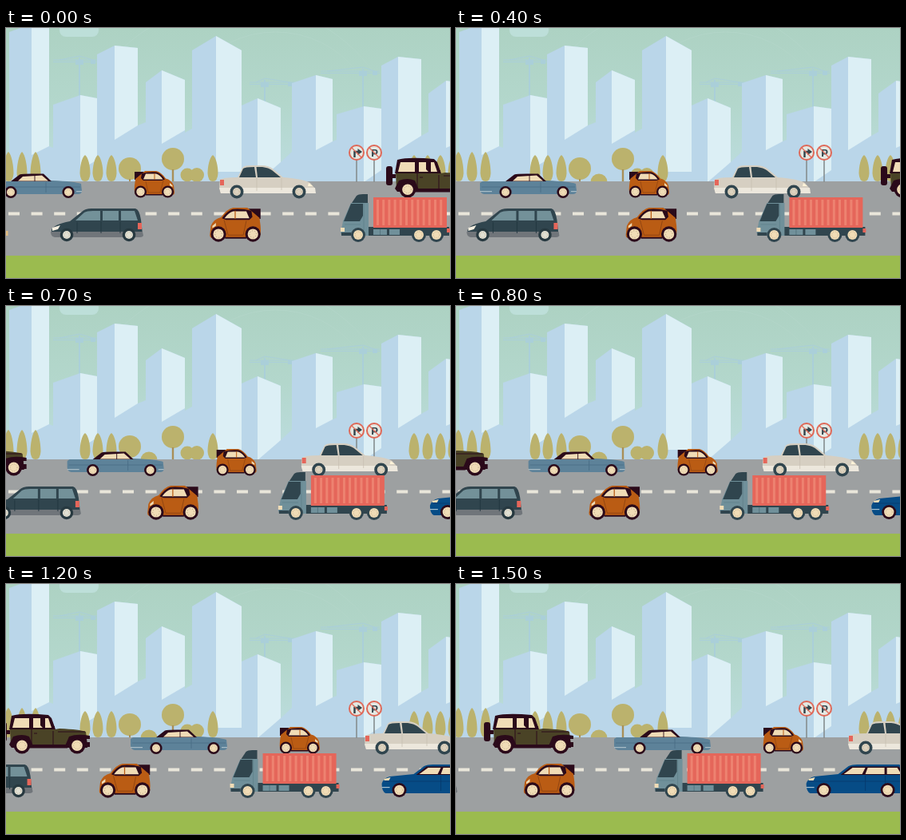
Recreate the animation shown at these times as an HTML page with a canvas. Size 556x313 px, loop 1.6 s.

```html
<!DOCTYPE html>
<html lang="en">
<head>
<meta charset="utf-8">
<title>City traffic</title>
<style>
html, body { margin: 0; width: 100%; height: 100%; overflow: hidden; background: #9ea1a2; }
canvas { display: block; width: 100vw; height: 100vh; }
</style>
</head>
<body>
<canvas id="stage" width="556" height="313"></canvas>
<script>
const ctx = document.getElementById('stage').getContext('2d');
const W = 556, H = 313, LOOP = 1600, STEP = 100;
const DARK = '#2b0a1a', CREAM = '#f0dcb6', SLATE = '#30454e', STEEL = '#70909a';
const RED = '#e5665a', ORANGE = '#ba5c14', OLIVE = '#4a4326';

function fill(color, d) {
  ctx.fillStyle = color;
  ctx.fill(new Path2D(d));
}
function line(color, width, d) {
  ctx.strokeStyle = color;
  ctx.lineWidth = width;
  ctx.stroke(new Path2D(d));
}
function rect(color, x, y, w, h) {
  ctx.fillStyle = color;
  ctx.fillRect(x, y, w, h);
}
function disc(color, x, y, r) {
  ctx.fillStyle = color;
  ctx.beginPath();
  ctx.arc(x, y, r, 0, Math.PI * 2);
  ctx.fill();
}
function wheels(xs, y, r, hub, tire = DARK, rim = CREAM) {
  for (const x of xs) {
    disc(tire, x, y, r);
    disc(rim, x, y, hub);
    ctx.setLineDash([1, 1.6]);
    ctx.strokeStyle = '#b59c7c';
    ctx.lineWidth = 0.7;
    ctx.beginPath();
    ctx.arc(x, y, hub * 0.65, 0, Math.PI * 2);
    ctx.stroke();
    ctx.setLineDash([]);
  }
}

// left, ridge, right: x positions; then the three roof heights and two lower edges of the lit face
const towers = [
  [4, 32, 54, 5, -5, -2, 159, 148],
  [59, 93, 114, 96, 84, 88, 178, 165],
  [114, 136, 165, 33, 22, 25, 140, 122],
  [175, 195, 224, 68, 53, 65, 145, 128],
  [233, 263, 295, 28, 10, 28, 180, 180],
  [295, 315, 344, 97, 88, 100, 193, 168],
  [358, 388, 409, 69, 59, 64, 153, 142],
  [414, 448, 470, 108, 98, 101, 193, 178],
  [470, 491, 520, 47, 36, 39, 153, 135],
  [529, 551, 575, 82, 66, 70, 150, 140]
];

function crane(x, y, left, right, bottom) {
  const c = '#aacfd9';
  line(c, 2, `M${x} ${y - 3}V${bottom}`);
  line(c, 1, `M${left} ${y}H${right}M${left} ${y + 2.5}H${right}M${left + 8} ${y}L${x} ${y - 5}L${right - 6} ${y}`);
  rect(c, x - 5, y, 10, 6);
  rect(c, right - 9, y, 6, 5);
}

function city() {
  const sky = ctx.createLinearGradient(0, 0, 0, 192);
  sky.addColorStop(0, '#add2c3');
  sky.addColorStop(0.5, '#b3d7cc');
  sky.addColorStop(1, '#bddde0');
  rect(sky, 0, 0, W, 193);
  line('#b3d6c9', 1, 'M110 70A210 210 0 0 1 470 70M235 55A130 130 0 0 1 440 55');
  ctx.fillStyle = '#bddfd9';
  ctx.beginPath();
  ctx.roundRect(67, -6, 49, 17, 8);
  ctx.fill();
  crane(92, 40, 59, 115, 90);
  crane(324, 68, 305, 362, 98);
  crane(447, 54, 394, 468, 102);

  const shade = '#bad6e9', light = '#dceff5';
  fill(shade, 'M0 160L54 148L59 150L114 150L165 122L175 118L224 131L233 126L295 150L344 168L358 155L409 142L414 140L470 150L520 135L529 130L556 128V193H0Z');
  for (const [l, m, r, yl, ym, yr, bm, br] of towers) {
    fill(shade, `M${l} ${yl}L${m} ${ym}L${r} ${yr}V193H${l}Z`);
    fill(light, `M${m} ${ym}L${r} ${yr}V${br}L${m} ${bm}Z`);
  }
}

function trees() {
  const leaf = '#bbb26d', trunk = '#a98f58';
  for (const [x, top] of [[3, 155], [20, 155], [37, 155], [99, 159], [115, 159], [132, 159],
    [259, 159], [511, 159], [528, 159], [544, 159], [560, 159]]) {
    fill(leaf, `M${x} ${top}C${x + 4} ${top + 3} ${x + 6.5} 173 ${x + 6.5} 182Q${x + 6} 192 ${x} 192Q${x - 6} 192 ${x - 6.5} 182C${x - 6.5} 173 ${x - 4} ${top + 3} ${x} ${top}Z`);
  }
  for (const [x, y, r] of [[155, 176, 14], [209, 164, 14], [179, 193, 10.5], [227, 184, 8.5], [239, 184, 9]]) {
    disc(leaf, x, y, r);
  }
  rect(trunk, 154, 189, 2, 3);
  rect(trunk, 207.8, 177, 2.4, 15);
}

function signs() {
  for (const x of [439, 461]) {
    rect('#858e90', x - 0.8, 164, 1.6, 29);
    disc('#df6857', x, 156, 10);
    disc('#e4e8e2', x, 156, 8);
  }
  line('#30424a', 2.4, 'M436.5 162V155H441');
  fill('#30424a', 'M440.5 151L446 155L440.5 159Z');
  ctx.fillStyle = '#30424a';
  ctx.font = 'bold 13px Arial, "Liberation Sans", sans-serif';
  ctx.textAlign = 'center';
  ctx.fillText('P', 461.5, 160.5);
  line('#df6857', 1.3, 'M433 150L445 162M455 150L467 162');
}

function road() {
  rect('#9da0a1', 0, 192, W, 93);
  rect('#9bbb4f', 0, 285, W, H - 285);
  for (let x = 3; x < W; x += 28.6) rect('#e9e6da', x, 230.5, 14, 4);
}

function convertible() {
  fill('#5d8299', 'M0 194L3 192H36L84 191Q112 192 120 195L121 204Q121 208 116 208H5Q0 207 0 202Z');
  line('#4b6f86', 0.9, 'M2 199H119M76 193V206');
  fill(DARK, 'M32 192L43 183.5Q46 182.5 58 182.5H73L83 192Z');
  fill(CREAM, 'M41 191.5L47 186L71 184.5L79 191.5Z');
  line(DARK, 0.9, 'M62 192V185');
  rect('#a9bdc7', 0, 204, 15, 1.2);
  rect('#a9bdc7', 114, 204, 7, 1.2);
  wheels([32, 104], 205.5, 7.6, 5);
}

function mini() {
  fill(DARK, 'M1 1H13L9 11L1 11Z');
  fill(ORANGE, 'M2 10L8 5L14 0H28Q34 1 40 9.5Q47 11 50 18L51 27Q51 30 48 30H3Q0 28 1 18Z');
  fill(DARK, 'M10 3Q20 0.5 29 1.5Q35 4 39 10.5L35 12L12 12L9 9Z');
  fill(CREAM, 'M12 10.5L15 3.5H28Q33 5 36.5 10.5Z');
  line(ORANGE, 1, 'M26 3V11');
  line('#8e4312', 0.7, 'M15 13L18 27H33L37 12');
  rect(DARK, 15, 29, 21, 1.5);
  fill(CREAM, 'M45 15L48.5 18V20L45 18Z');
  wheels([8.5, 42.5], 26, 7.6, 5.2);
}

function sedan() {
  fill('#d6cfc2', 'M1 190Q4 187 23 187L29 175Q31 172 39 172H53Q62 172 68 177L80 187Q106 189 114 194L120 201V207H2Q-1 200 1 190Z');
  fill('#ece7dc', 'M0 200H120L121 207H2Z');
  fill(SLATE, 'M25 187L30 176Q32 174 44 174L46 187ZM48 187L46.5 174H54Q62 175 66 178L77 187Z');
  line('#c6beb1', 0.7, 'M47 188V204M78 188V203');
  rect(RED, 1, 190, 5, 7);
  fill('#fff4d9', 'M112 194L117 198H111Z');
  wheels([22, 100], 205, 8.5, 4.9, SLATE, '#dcd3c0');
}

function jeep() {
  fill(DARK, 'M11 182L14 165Q28 161 60 164L64 168L69 182Z');
  ctx.fillStyle = DARK;
  ctx.beginPath();
  ctx.roundRect(0, 173, 8, 24, 3);
  ctx.fill();
  rect(DARK, 6, 183, 6, 5);
  fill(OLIVE, 'M12 182H68L74 181Q100 182 107 185L109 203H13Z');
  fill(CREAM, 'M15 180L18 168H36V180ZM41 180V168H50V177L53 180ZM56 180V168H60L64 180Z');
  line(DARK, 1, 'M39 181V203M66 184V203M42 187H46M72 185H106');
  rect(DARK, 64, 178, 4, 4);
  rect(DARK, 36, 201, 48, 4.5);
  fill(DARK, 'M11 201L16 191Q27 187 36 191L42 205H14Z');
  fill(DARK, 'M80 205L86 191Q96 187 112 190V194H108L109 205Z');
  rect(DARK, 106, 198, 6, 6);
  wheels([27, 96], 202.2, 10.3, 6.8);
}

function van() {
  fill(SLATE, 'M1 253Q3 246 24 242L39 230Q43 226 51 226H106Q111 227 113 240L115 258H1Z');
  fill('#70757a', 'M0 255H115L116 260Q115 262 112 262H5Q0 261 0 255Z');
  fill('#739199', 'M31 241L42 231Q45 229 53 229H62V241ZM65 229H85V241H65ZM88 229H105L109 241H88Z');
  line('#223740', 0.9, 'M33 243V257M63 242V257M87 242V257');
  fill('#f4eee0', 'M2 250L12 247L9 252L2 254Z');
  rect(RED, 109, 244, 5, 8);
  wheels([20, 98], 259, 8.3, 5, '#273940', '#e0e0d4');
}

function truck() {
  rect(SLATE, 30, 249, 107, 11);
  fill(STEEL, 'M2 252L4 242L14 219H36V260H3Q0 257 2 252Z');
  fill(SLATE, 'M15 219L21 210Q23 208 29 208H35V219Z');
  fill(SLATE, 'M5 242L14 220H29V235L25 242Z');
  line('#60818b', 0.8, 'M30 220V257M6 246H26');
  rect(RED, 42, 212, 92, 38);
  for (let x = 46; x < 132; x += 7.2) rect('#ed8270', x, 215, 3, 32);
  rect(STEEL, 42, 252, 17, 7);
  rect(STEEL, 62, 252, 13, 7);
  rect('#587680', 50, 252, 1, 7);
  rect(CREAM, 1, 250, 5, 5);
  rect(SLATE, 2, 256, 12, 4);
  rect(RED, 134, 251, 4, 5);
  wheels([23, 99, 121], 259, 9, 6, SLATE);
}

function wagon() {
  fill('#064c86', 'M0 250Q2 243 10 241L40 238L53 228Q57 226 64 226H116Q123 228 128 240L130 258Q129 262 124 262H5Q0 260 0 250Z');
  fill(DARK, 'M43 239L56 228.5H116L123 239Z');
  fill(CREAM, 'M47 238L58 230H74L70 238ZM74 238L77 230H98V238ZM101 230H114L119 238H101Z');
  line('#07396a', 0.8, 'M4 247H126M74 240V259M99 240V257');
  fill(CREAM, 'M3 244L11 242L9 246H3Z');
  rect('#a9c1d0', 0, 254, 10, 1.2);
  wheels([22, 102], 258, 9, 6.2);
}

function place(draw, x, y = 0, sx = 1, sy = 1) {
  ctx.save();
  ctx.translate(x, y);
  ctx.scale(sx, sy);
  draw();
  ctx.restore();
}

// The traffic advances in uneven ticks: three per step, with an extra one at steps 6, 9 and 12.
function ticks(step) {
  return 3 * step + Math.max(0, Math.min(3, Math.floor(step / 3) - 1));
}

function render(now) {
  const t = ticks(Math.floor((now % LOOP) / STEP));
  const right = t * 14 / 3, left = -t * 3.55;
  city();
  trees();
  road();
  signs();

  place(jeep, -189 + right);
  place(convertible, -26 + right);
  place(mini, 160 + right, 179);
  place(sedan, 267 + right);
  place(jeep, 476 + right);

  rect('#e2bd83', left, 254, 2.5, 6);
  place(van, 56 + left);
  place(mini, 320 + left, 225, -1.27, 1.27);
  place(truck, 418 + left);
  place(wagon, 609 + left);
}

function loop() {
  render(performance.now());
  requestAnimationFrame(loop);
}
loop();
</script>
</body>
</html>
```
